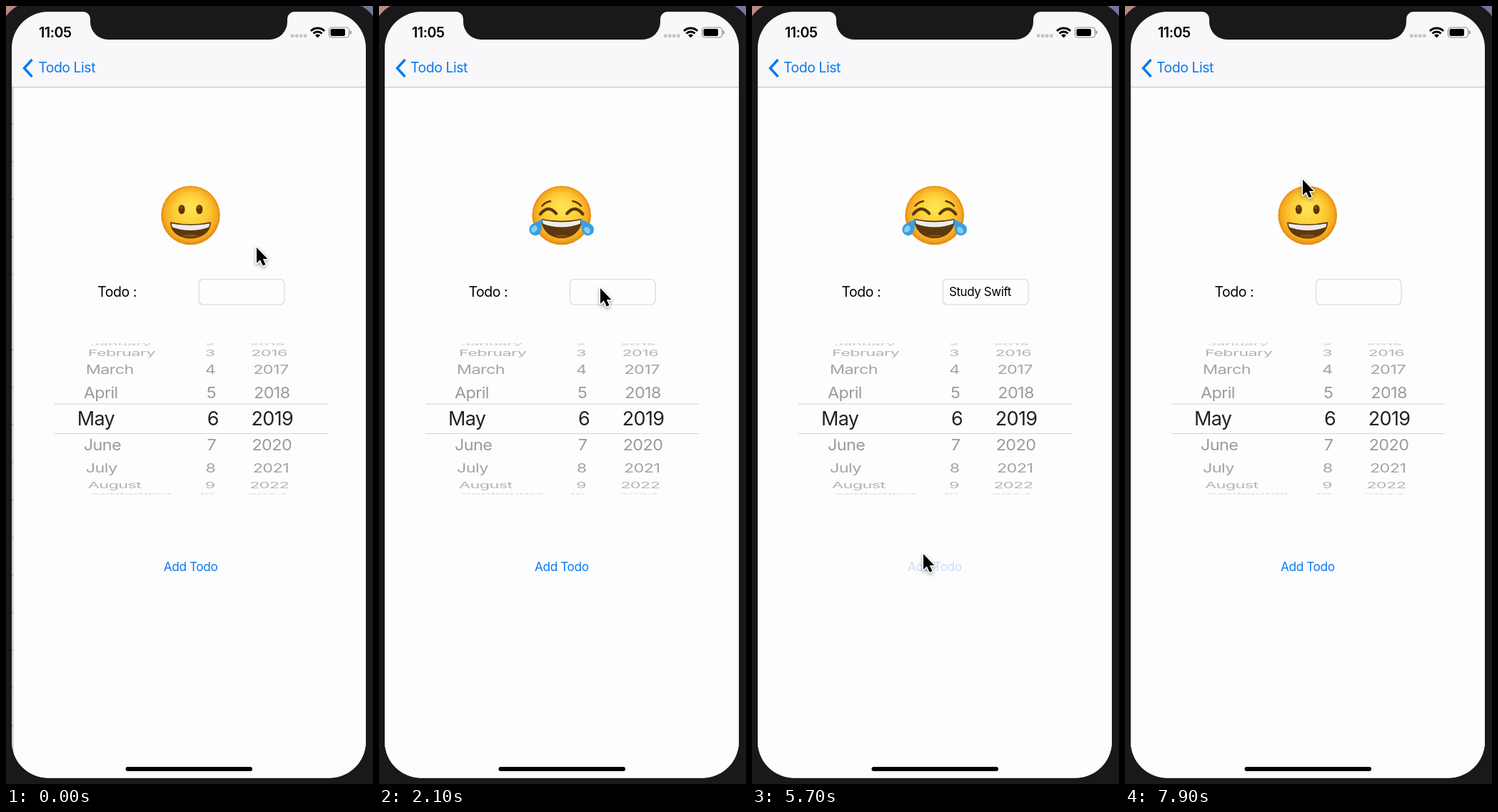
An HTML page with a canvas that plays this animation: 514 px wide and 1089 px high, repeating every 8 s.

```html
<!DOCTYPE html>
<html lang="en">
<head>
<meta charset="utf-8">
<title>Todo app</title>
<style>
html, body { margin: 0; width: 100%; height: 100%; overflow: hidden; background: #1a181a; }
canvas { display: block; }
</style>
</head>
<body>
<canvas id="stage" width="514" height="1089"></canvas>
<script>
const g = document.getElementById('stage').getContext('2d');
const LOOP = 8000, STEP = 100, WIDTH = 495;
const BLUE = [8, 122, 238], GRAY = [142, 142, 147], BROWN = '#5c360b';
const MONTHS = ['January', 'February', 'March', 'April', 'May', 'June', 'July', 'August', 'September'];
const GRID = [
  'arc grin', 'joy open joy', 'tall open', 'arc open', 'arc open sweat',
  'squint open', 'arc smile halo', 'evil smile devil', 'wink smile', 'arc smile blush',
  'arc yum', 'sleep smile', 'heart open', 'shade smile', 'side smirk',
  'dot flat', 'line flat', 'side frown', 'sleep frown drop', 'sleep frown',
  'dot slant', 'squint wave', 'dot kiss', 'wink kiss love', 'arc kiss'
];
const KEY_TIMES = [3000, 3200, 3300, 3400, 3500, 3600, 3800, 4100, 4400, 4600, 4700];
const POINTER = [
  [0, 350, 337], [400, 285, 318], [900, 285, 318], [1300, 178, 395], [1600, 178, 395],
  [2000, 309, 394], [4700, 309, 394], [5100, 262, 833], [5400, 239, 766], [5900, 239, 766],
  [6700, 476.5, 78], [7300, 476.5, 78], [7900, 248, 242]
];

const clamp = v => Math.max(0, Math.min(1, v));
const ramp = (t, from, to) => clamp((t - from) / (to - from));
const rgb = c => `rgb(${c.map(Math.round)})`;
const mix = (a, b, k) => rgb(a.map((v, i) => v + (b[i] - v) * k));
// Critically damped spring, from 1 down to 0
const spring = ms => { const a = Math.max(0, ms) * 0.0185; return (1 + a) * Math.exp(-a); };

function layer(draw, x = 0, y = 0, alpha = 1) {
  g.save();
  g.translate(x, y);
  g.globalAlpha *= alpha;
  draw();
  g.restore();
}
function fill(d, color) { g.fillStyle = color; g.fill(new Path2D(d)); }
function line(d, color, width) {
  g.strokeStyle = color;
  g.lineWidth = width;
  g.stroke(new Path2D(d));
}
function box(x, y, w, h, r, color) {
  g.beginPath();
  g.roundRect(x, y, w, h, r);
  g.fillStyle = color;
  g.fill();
}
function oval(x, y, rx, ry, color) {
  g.beginPath();
  g.ellipse(x, y, rx, ry, 0, 0, 7);
  g.fillStyle = color;
  g.fill();
}
function text(s, x, y, size, color, align = 'left', weight = 400) {
  g.font = `${weight} ${size}px Inter, sans-serif`;
  g.letterSpacing = `${-0.025 * size}px`;
  g.textAlign = align;
  g.textBaseline = 'middle';
  g.fillStyle = color;
  g.fillText(s, x, y);
}

// Faces are drawn in a circle of radius 100
function both(draw) {
  draw();
  layer(() => { g.scale(-1, 1); draw(); });
}
const ink = (d, w = 9) => line(d, BROWN, w);
const heart = (x, y, s) => layer(() => {
  g.scale(s, s);
  fill('M0 25C-40 0 -28 -28 -10 -24Q-2 -22 0 -13Q2 -22 10 -24C28 -28 40 0 0 25Z', '#e02030');
}, x, y);
const drop = (x, y, angle, s = 1) => layer(() => {
  g.rotate(angle);
  g.scale(s, s);
  fill('M0 -44C8 -18 24 -6 24 12A24 24 0 0 1 -24 12C-24 -6 -8 -18 0 -44Z', '#3a9fe0');
  oval(-4, 12, 11, 15, '#86cdf5');
}, x, y);
const dot = (x, ry = 16) => { oval(x, -20, 11, ry, BROWN); oval(x - 2, -26, 4, 5, '#80561f'); };

const EYES = {
  dot() { dot(-30); dot(30); },
  tall() { dot(-28, 23); dot(28, 23); },
  arc: () => both(() => ink('M-50 -14Q-33 -44 -16 -14')),
  joy: () => both(() => { ink('M-72 -4Q-46 -38 -18 -6', 10); ink('M-66 -32Q-54 -46 -38 -48', 6); }),
  sleep: () => both(() => { ink('M-52 -14Q-34 6 -16 -14'); ink('M-56 -32Q-44 -46 -28 -46', 6); }),
  squint: () => both(() => ink('M-58 -38L-18 -20L-56 -4')),
  wink() { dot(-30); ink('M14 -18Q34 -36 54 -16'); ink('M-48 -46Q-32 -56 -18 -46', 6); },
  line: () => both(() => ink('M-52 -15H-16')),
  side() {
    for (const x of [-34, 34]) {
      ink(`M${x - 20} -22H${x + 20}`, 8);
      oval(x + 7, -14, 8, 9, BROWN);
    }
    ink('M-56 -42Q-40 -50 -20 -44M20 -46Q40 -54 56 -44', 6);
  },
  heart() { heart(-42, -22, 1.3); heart(42, -22, 1.3); },
  shade() {
    both(() => fill('M0 -38H-92V-26Q-84 12 -48 12Q-16 10 -8 -22H0Z', '#252528'));
    line('M-72 -26L-52 -26M20 -26L40 -26', '#77777c', 6);
  },
  evil: () => both(() => { fill('M-56 -30L-14 -8Q-24 12 -40 6Q-54 0 -56 -30Z', '#32104e'); })
};

function openMouth(top, bottom) {
  const d = `M-67 ${top}Q0 ${top + 14} 67 ${top}C64 ${bottom + 8} -64 ${bottom + 8} -67 ${top}Z`;
  fill(d, '#5c390c');
  layer(() => {
    g.clip(new Path2D(d));
    oval(0, bottom + 2, 46, 24, '#805119');
    fill(`M-70 ${top - 5}H70V${top + 12}Q0 ${top + 40} -70 ${top + 12}Z`, '#ececec');
  });
  ink(d, 4);
}
const MOUTHS = {
  open: () => openMouth(14, 88),
  big: () => openMouth(25, 86),
  grin() {
    openMouth(18, 84);
    fill('M-60 28Q0 42 60 28Q44 66 0 68Q-44 66 -60 28Z', '#ececec');
    ink('M-52 44Q0 56 52 44', 3);
  },
  smile: () => ink('M-42 26Q0 66 42 26'),
  flat: () => ink('M-38 40H38'),
  frown: () => ink('M-28 50Q0 26 28 50'),
  smirk: () => ink('M-26 42Q16 52 40 22'),
  slant: () => ink('M-30 52Q0 28 36 36'),
  wave: () => ink('M-48 54L-32 36L-16 52L0 36L16 52L32 36L48 54'),
  kiss: () => ink('M-6 20Q26 26 2 40Q26 50 -6 60', 8),
  yum() {
    ink('M-46 18Q0 62 50 18');
    layer(() => { g.rotate(-0.5); box(-16, -18, 32, 48, 16, '#d93384'); }, 52, 46);
  }
};
const EXTRAS = {
  joy() { drop(-84, 40, 0.6, 0.84); drop(84, 40, -0.6, 0.84); },
  sweat: () => drop(68, -46, 0.15, 1.15),
  drop: () => drop(-62, -50, 0.15, 1.4),
  blush: () => both(() => oval(-62, 18, 20, 13, 'rgba(245,85,50,.45)')),
  love: () => heart(68, 50, 1.3),
  halo() {
    g.beginPath();
    g.ellipse(0, -72, 92, 22, 0, 0, 7);
    g.strokeStyle = '#4aa0dc';
    g.lineWidth = 15;
    g.stroke();
  },
  devil() {}
};

function face(x, y, r, spec) {
  const [eyes, mouth, extra] = spec.split(' ');
  const evil = extra === 'devil';
  layer(() => {
    g.scale(r / 100, r / 100);
    g.lineCap = g.lineJoin = 'round';
    if (evil) both(() => fill('M-90 -15C-108 -60 -100 -90 -92 -102C-76 -74 -50 -66 -30 -60Z', '#57277f'));
    const skin = g.createRadialGradient(0, -30, 15, 0, 0, 102);
    const tones = evil ? ['#8a44ad', '#79379e', '#642c88', '#4c206e'] : ['#ffe04e', '#fdcb36', '#f5a820', '#df820e'];
    [0, 0.5, 0.86, 1].forEach((stop, i) => skin.addColorStop(stop, tones[i]));
    oval(0, 0, 100, 100, skin);
    EYES[eyes]();
    MOUTHS[mouth]();
    if (extra) EXTRAS[extra]();
  }, x, y);
}

function picker() {
  layer(() => {
    g.beginPath();
    g.rect(60, 472, 400, 211.5);
    g.clip();
    MONTHS.forEach((month, i) => {
      const k = Math.abs(i - 4), angle = (i - 4) * Math.PI / 9;
      const size = k ? 23.4 : 27;
      const color = k ? rgb([0, 0, 0].map(() => 152 + k * k * 3)) : '#232325';
      layer(() => {
        g.scale(1, Math.cos(angle));
        text(month, k ? 103 + 3 * k : 97, 0, size, color);
        text(i + 2, k ? 292 - k * 0.7 : 295, 0, size, color, 'right');
        text(2015 + i, 370 - k * k * 0.47, 0, size, color, 'center');
      }, 0, 578.7 + 107 * Math.sin(angle));
    });
  });
  line('M65 557H448M65 598.5H448', '#d2d2d5', 1.2);
}

function form(t, popover) {
  const fresh = t < 1400 || t >= 6900;
  box(8, 113, 500, 970, 0, '#fefdfe');
  face(255.7, 293, 41.3, fresh ? 'dot big' : 'joy open joy');
  text('Todo :', 125.5, 401, 19.5, '#000');
  g.beginPath();
  g.roundRect(267.5, 382.5, 119.5, 35.5, 6);
  g.strokeStyle = '#d9d9de';
  g.lineWidth = 1.2;
  g.stroke();
  const typed = t < 6900 ? 'Study Swift'.slice(0, KEY_TIMES.filter(k => k <= t).length) : '';
  text(typed, 276, 400.5, 17, '#000');
  if (t >= 2200 && t < 5000) box(276 + g.measureText(typed).width, 389, 2.4, 22, 1, '#3d6fe4');
  picker();
  const pressed = t >= 5600 && t < 5800;
  layer(() => text('Add Todo', 218, 785.5, 17.3, mix(BLUE, GRAY, popover)), 0, 0, pressed ? 0.22 : 1);
}

function list(t, shown) {
  const filled = t > 5000, pitch = filled ? 120.3 : 52.6;
  box(8, 113, 500, 970, 0, '#fefdfe');
  layer(() => {
    for (let y = 112.7 + pitch; y < 1060; y += pitch) line(`M28 ${y}H660`, '#c6c6ca', 1.1);
    if (!filled) return;
    face(80, 173, 41, 'joy open joy');
    text('Study Swift', 164, 162, 25, '#000');
    text('May 6, 2019', 164, 218, 14.5, '#000');
  }, -148.5 * shown);
  box(8, 113, 500, 970, 0, `rgba(0,0,10,${0.11 * shown})`);
}

function popoverCard() {
  layer(() => {
    g.beginPath();
    g.rect(8, 114, 497, 970);
    g.clip();
    g.shadowColor = 'rgba(10,0,10,.135)';
    g.shadowBlur = 190;
    g.shadowOffsetX = 2000;
    box(-2050, 285, 612, 525, 20, '#000');
  });
  fill('M236 369Q243 367 250 358Q256 350 263 358Q270 367 277 369Z', '#f5f4f6');
  box(64.5, 368, 383.5, 359, 16, '#fefdfe');
  GRID.forEach((spec, i) => face(94.5 + (i % 5) * 80.7, 398.5 + Math.floor(i / 5) * 71.9, 20.7, spec));
}

function navBar(t, shown, popover) {
  box(8, 8, 500, 105, 0, '#f8f7f9');
  line('M8 113.5H505', '#bdbdc1', 1.2);
  const tint = mix(BLUE, GRAY, popover);
  layer(() => line('M36.5 75L25.5 87L36.5 99', tint, 3.4), 0, 0, shown);
  layer(() => text('Edit', 33, 87, 19.5, rgb(BLUE)), 0, 0, 1 - shown);
  const plusAlpha = (1 - shown) * (t >= 6800 && t < 7300 ? 0.6 : 1);
  layer(() => line('M459 86.5H479M469 76.5V96.5', rgb(BLUE), 1.8), 0, 0, plusAlpha);
  const settled = shown > 0.85;
  const color = settled ? tint : mix([0, 0, 0], BLUE, shown * shown);
  layer(() => text('Todo List', 213 - 169 * shown ** 1.2, 87, settled ? 19.5 : 19.2, color, 'left', settled ? 400 : 600),
    0, 0, 1 - 0.8 * shown * (1 - shown));
}

function statusBar() {
  text('11:05', 46, 38, 19.7, '#000', 'left', 600);
  for (let i = 0; i < 4; i++) box(399 + i * 6, 39.5, 4.4, 4.4, 1, '#c3c2c5');
  for (const r of [5, 10, 15]) {
    g.beginPath();
    if (r === 5) g.moveTo(436.5, 44.5);
    g.arc(436.5, 44.5, r === 5 ? 5 : r - 1.5, -Math.PI * 0.75, -Math.PI * 0.25);
    g.fillStyle = g.strokeStyle = '#000';
    g.lineWidth = 3;
    r === 5 ? g.fill() : g.stroke();
  }
  g.beginPath();
  g.roundRect(452.5, 30, 28, 14, 4);
  g.strokeStyle = '#8d8d90';
  g.lineWidth = 1.2;
  g.stroke();
  box(454.5, 32, 20.5, 10, 2.2, '#000');
  box(481.8, 34.5, 1.8, 5, 1, '#8d8d90');
}

function pointer(t) {
  const next = POINTER.findIndex(p => p[0] > t);
  const b = POINTER.at(next), a = next > 0 ? POINTER[next - 1] : b;
  let k = a === b ? 0 : ramp(t, a[0], b[0]);
  k = k * k * (3 - 2 * k);
  layer(() => {
    const arrow = 'M0 0V23.5L5.3 18.6L9.4 27.5L13.4 25.8L9.5 17.3H16.5Z';
    g.scale(0.93, 0.93);
    g.lineJoin = 'round';
    layer(() => {
      g.shadowColor = 'rgba(0,0,0,.4)';
      g.shadowBlur = 5;
      g.shadowOffsetY = 2;
      line(arrow, '#fff', 3);
    });
    fill(arrow, '#000');
  }, a[1] + (b[1] - a[1]) * k + 1, a[2] + (b[2] - a[2]) * k + 1);
}

function render(t) {
  const desktop = g.createLinearGradient(0, 0, 514, 0);
  desktop.addColorStop(0, '#b98a80');
  desktop.addColorStop(1, '#74759a');
  box(0, 0, 514, 1089, 0, desktop);
  box(-10, -7, 534, 1160, 52, '#1a181a');

  const away = t >= 7000 ? spring(t - 7000) : t >= 5800 ? 1 - spring(t - 5800) : spring(t + 395);
  const offset = WIDTH * away, shown = 1 - away;
  const popover = ramp(t, 450, 700) * (1 - ramp(t, 1350, 1650));

  layer(() => {
    g.beginPath();
    g.roundRect(8, 8, 496, 1072.5, 51);
    g.clip();
    list(t, shown);
    if (offset > 0.2) {
      const edge = 8 + offset;
      const shade = g.createLinearGradient(edge - 10, 0, edge, 0);
      shade.addColorStop(0, 'rgba(0,0,0,0)');
      shade.addColorStop(1, `rgba(0,0,0,${0.1 * shown})`);
      box(edge - 10, 113, 10, 970, 0, shade);
    }
    layer(() => form(t, popover), offset);
    navBar(t, shown, popover);
    if (popover > 0) layer(popoverCard, 0, 0, popover);
    statusBar();
    box(167.5, 1065, 177.5, 6, 3, '#000');
  });
  fill('M108 7V8A10 10 0 0 1 118 18V22A25 25 0 0 0 143 47H369A25 25 0 0 0 394 22V18A10 10 0 0 1 404 8V7Z', '#1a181a');
  pointer(t);
}

function frame() {
  render(Math.floor(performance.now() % LOOP / STEP) * STEP);
  requestAnimationFrame(frame);
}
frame();
</script>
</body>
</html>
```
